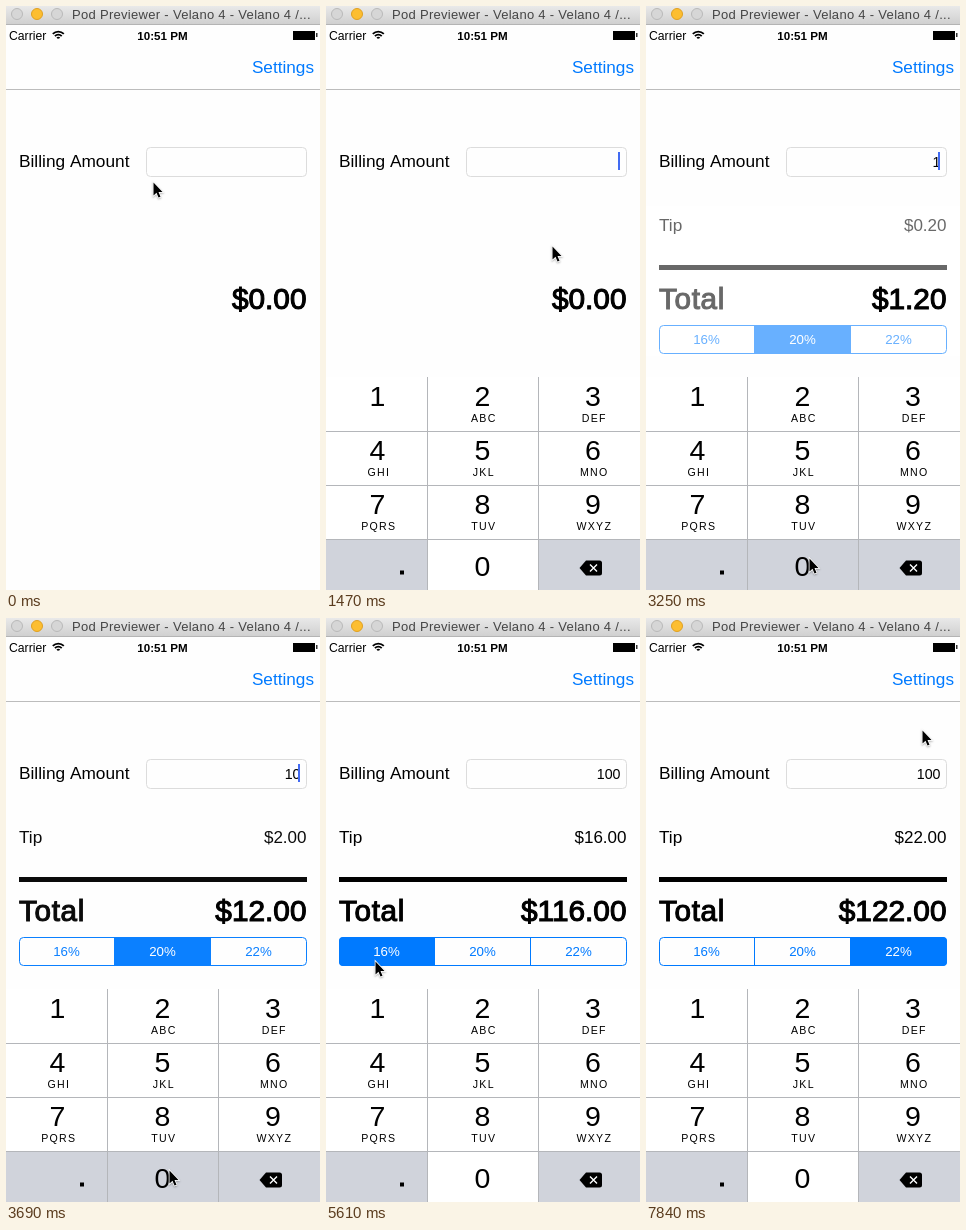
An HTML page with a canvas for the animation above (7990 ms loop, 314 px wide and 584 px high).

```html
<!DOCTYPE html>
<html lang="en">
<head>
<meta charset="utf-8">
<title>Tip calculator</title>
<style>
html, body { margin: 0; width: 100%; height: 100%; overflow: hidden; background: #fefefe; }
canvas { display: block; }
</style>
</head>
<body>
<canvas id="stage" width="314" height="584"></canvas>
<script>
const c = document.getElementById('stage').getContext('2d');
const LOOP = 7990, STEPS = 54;
const BLUE = '#007aff', GREY = '#d0d3db', PAPER = '#fefefe', LINE = '#b4b6ba';
const LETTERS = ['', 'ABC', 'DEF', 'GHI', 'JKL', 'MNO', 'PQRS', 'TUV', 'WXYZ'];
const RATES = [16, 20, 22];

// Places where the pointer pauses or turns: step, x, y
const STOPS = [
  [0, 147, 176], [3, 240, 158], [8, 240, 158], [10, 226, 240], [13, 50, 395],
  [18, 214, 503], [22, 163, 552], [27, 163, 552], [31, 90, 341], [38, 49, 343],
  [44, 302, 338], [47, 275, 333], [50, 297, 240], [53, 276, 112]
];

const clamp = v => Math.max(0, Math.min(1, v));
const ease = v => { const k = clamp(v); return k * k * (3 - 2 * k); };
const money = v => '$' + v.toFixed(2);

function rect(x, y, w, h, fill) {
  c.fillStyle = fill;
  c.fillRect(x, y, w, h);
}

function box(x, y, w, h, color) {
  c.beginPath();
  c.roundRect(x, y, w, h, 4);
  c.strokeStyle = color;
  c.lineWidth = 1;
  c.stroke();
}

function disc(x, y, r, fill, rim) {
  c.beginPath();
  c.arc(x, y, r, 0, 7);
  c.fillStyle = fill;
  c.fill();
  c.strokeStyle = rim;
  c.lineWidth = 1;
  c.stroke();
}

function text(s, x, y, size, { align = 'left', color = '#000', weight = '', gap = 0, stroke = 0 } = {}) {
  c.font = `${weight} ${size}px "Liberation Sans", Arial, sans-serif`;
  c.letterSpacing = gap + 'px';
  c.textAlign = align;
  c.fillStyle = c.strokeStyle = color;
  c.fillText(s, x, y);
  if (stroke) {
    c.lineWidth = stroke;
    c.strokeText(s, x, y);
  }
}

function titleBar() {
  const g = c.createLinearGradient(0, 0, 0, 18);
  g.addColorStop(0, '#e9e9e9');
  g.addColorStop(1, '#d0d0d0');
  rect(0, 0, 314, 18, g);
  rect(0, 18, 314, 1, '#b4b4b4');
  disc(11, 8, 5.5, '#d6d6d6', '#b9b9b9');
  disc(31, 8, 5.5, '#fdbe30', '#dfa023');
  disc(51, 8, 5.5, '#d6d6d6', '#b9b9b9');
  text('Pod Previewer - Velano 4 - Velano 4 /...', 66, 13, 13, { color: '#454545', gap: 0.3 });
}

function statusBar() {
  text('Carrier', 3, 33.5, 12.2);
  text('10:51 PM', 156.5, 33.5, 11.6, { align: 'center', weight: 'bold' });
  c.strokeStyle = '#000';
  c.lineWidth = 1.8;
  for (let r = 1.8; r < 9; r += 3) {
    c.beginPath();
    c.arc(52.3, 33.5, r, -Math.PI * 0.75, -Math.PI * 0.25);
    c.stroke();
  }
  rect(287, 25, 22, 9, '#000');
  rect(310, 27, 1.5, 4, '#333');
  text('Settings', 308, 67, 17.2, { align: 'right', color: BLUE });
  rect(0, 83, 314, 1, '#bcbcbc');
}

function tipPanel(tip, chosen, pressed, alpha) {
  text('Tip', 13, 224.5, 17.2);
  text(money(tip), 300.5, 224.5, 17, { align: 'right' });
  rect(13, 259, 288, 5, '#000');
  text('Total', 13, 303.3, 29.6, { stroke: 1.1, gap: 0.7 });
  c.save();
  c.beginPath();
  c.roundRect(13, 319, 288, 29, 4);
  c.clip();
  RATES.forEach((rate, i) => {
    const on = i === chosen, x = 13 + 96 * i;
    if (on || i === pressed) rect(x, 319, 96, 29, on ? BLUE : '#d9ebff');
    if (i) rect(x - 1, 319, 1, 29, BLUE);
    text(rate + '%', x + 47.5, 338.3, 13.3, { align: 'center', color: on ? '#fff' : BLUE });
  });
  c.restore();
  box(13.5, 319.5, 287, 28, BLUE);
  // A veil fades the panel as one group.
  c.globalAlpha = 1 - alpha;
  rect(0, 200, 314, 150, PAPER);
  c.globalAlpha = 1;
}

function backspace() {
  c.beginPath();
  c.moveTo(253.5, 562);
  c.lineTo(260, 554.5);
  c.arcTo(276, 554.5, 276, 569.5, 2.5);
  c.arcTo(276, 569.5, 260, 569.5, 2.5);
  c.lineTo(260, 569.5);
  c.fillStyle = '#000';
  c.fill();
  c.beginPath();
  for (const d of [-3.5, 3.5]) {
    c.moveTo(267.5 - d, 558.5);
    c.lineTo(267.5 + d, 565.5);
  }
  c.strokeStyle = '#fff';
  c.lineWidth = 1.4;
  c.stroke();
}

function keyboard(dy, held) {
  c.save();
  c.translate(0, dy);
  rect(0, 371, 314, 213, '#fff');
  rect(0, 533, 314, 51, GREY);
  if (held !== 0) rect(102, 533, 110, 51, '#fff');
  if (held === 1) rect(0, 371, 101, 54, GREY);
  for (let y = 425; y < 584; y += 54) rect(0, y, 314, 1, LINE);
  for (const x of [101, 212]) rect(x, 371, 1, 213, LINE);
  LETTERS.forEach((letters, i) => {
    const x = [51.5, 156.5, 267][i % 3], y = 54 * Math.floor(i / 3);
    text(i + 1, x, 400.3 + y, 28.5, { align: 'center' });
    text(letters, x + 1.3, 416 + y, 10.6, { align: 'center', gap: 1.3 });
  });
  text('0', 156.5, 570, 28.5, { align: 'center' });
  rect(74, 564.5, 4, 4, '#000');
  backspace();
  c.restore();
}

function pointer(n) {
  const i = Math.max(1, STOPS.findIndex(s => s[0] >= n));
  const [a, x0, y0] = STOPS[i - 1], [b, x1, y1] = STOPS[i];
  const k = ease((n - a) / (b - a));
  c.save();
  c.translate(x0 + (x1 - x0) * k + 0.5, y0 + (y1 - y0) * k + 0.5);
  c.shadowColor = 'rgba(0,0,0,.3)';
  c.shadowBlur = 2;
  c.shadowOffsetY = 1;
  const arrow = new Path2D('M0 0V13L3 10.3 5 15 7 14.2 5 9.5H9Z');
  c.strokeStyle = '#fff';
  c.lineWidth = 1.6;
  c.stroke(arrow);
  c.shadowColor = 'transparent';
  c.fillStyle = '#000';
  c.fill(arrow);
  c.restore();
}

// The caret stays solid while typing, then blinks.
function caret(n) {
  c.globalAlpha = n < 28 ? 1 : clamp(0.25 + 2 * Math.sin((n - 47) * Math.PI / 3.2));
  rect(292, 146, 2, 18, '#426bf2');
  c.globalAlpha = 1;
}

function draw(n) {
  const bill = n < 14 ? 0 : n < 23 ? 1 : n < 26 ? 10 : 100;
  const chosen = n < 35 ? 1 : n < 48 ? 0 : 2;
  const pressed = n === 34 ? 0 : n === 47 ? 2 : -1;
  const held = n === 13 ? 1 : n === 22 || n === 25 ? 0 : -1;
  const tip = bill * RATES[chosen] / 100;

  rect(0, 0, 314, 584, PAPER);
  titleBar();
  statusBar();
  text('Billing Amount', 13, 160.5, 17.3);
  box(140.5, 141.5, 160, 29, '#dcdcdc');
  if (bill) text(bill, 294.5, 161, 14.2, { align: 'right' });
  tipPanel(tip, chosen, pressed, ease((n - 16.6) / 9.6));
  text(money(bill + tip), 300.5, 303.3, 29.8, { align: 'right', stroke: 1.1 });
  if (n >= 7) {
    caret(n);
    keyboard(213 * (1 - ease((n - 6) / 4)), held);
  }
  pointer(n);
}

function tick() {
  const t = performance.now() % LOOP;
  draw(Math.min(STEPS - 1, Math.floor((t + 15) * STEPS / LOOP)));
  requestAnimationFrame(tick);
}
tick();
</script>
</body>
</html>
```
